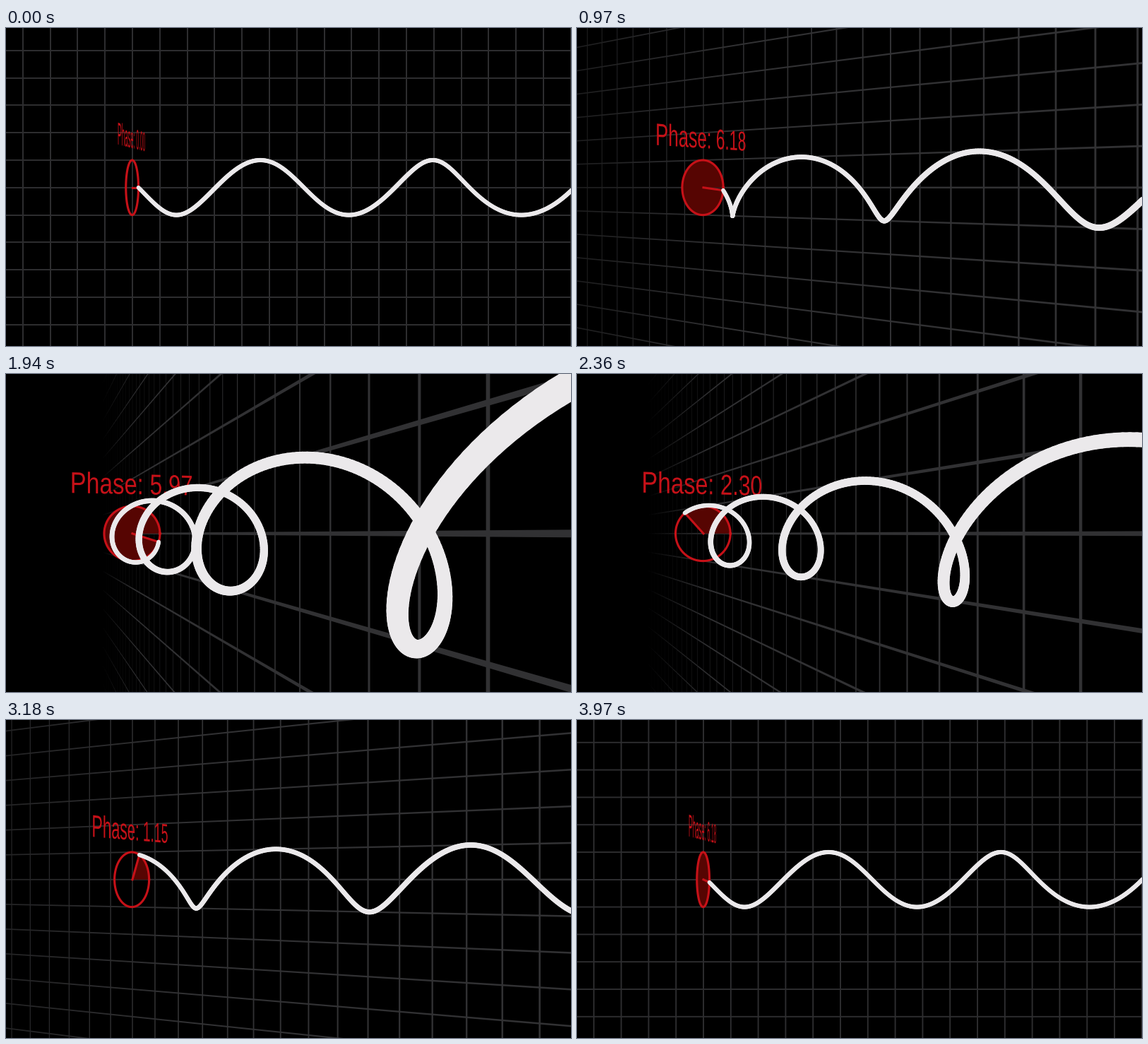
A matplotlib script for the animation above (4 s loop, 800 by 450 pixels).

```python
import numpy as np
import matplotlib.pyplot as plt
from matplotlib.animation import FuncAnimation
from matplotlib.collections import LineCollection, PolyCollection
from matplotlib.patches import PathPatch, Polygon
from matplotlib.path import Path
from matplotlib.textpath import TextPath

W, H, DPI = 800, 450, 100
PT = 72 / DPI                      # points per pixel

LOOP, TICK = 4000, 10              # ms
TICKS = LOOP // TICK
STEPS, POSES, CYCLE = 132, 240, 60

UNIT, DIST = 38.8, 24.94           # pixels per unit at the pivot, camera distance
FOCAL = UNIT * DIST
CX, CY = 400, 225.8
PIVOT = (179 - CX) / UNIT
SWING = np.radians(70)

RED, DARK_RED, WHITE = "#c61118", "#560502", "#ebe9eb"
GRID = np.array([49, 49, 51]) / 255
GRID_HALF = 0.025
FOG_NEAR, FOG_FAR = 24, 37
WAVE_PX, RING_PX = 6.05, 3.1

EM, CONDENSED, BASELINE = 1.06, 0.778, 1.44

plt.rcParams["font.family"] = "Liberation Sans"


def project(u, y, b, angle):
    """Map axis position u, height y and sideways offset b to pixels and depth."""
    u, y, b = np.broadcast_arrays(u, y, b)
    c, s = np.cos(angle), np.sin(angle)
    depth = DIST - u * s + b * c
    k = FOCAL / np.maximum(depth, 0.1)
    pts = np.stack([CX + k * (PIVOT + u * c + b * s), CY - k * y], axis=-1)
    return pts, depth


def strips(u0, u1, y0, y1):
    """Corner coordinates of rectangles lying in the grid plane."""
    return np.stack([u0, u1, u1, u0], axis=-1), np.stack([y0, y0, y1, y1], axis=-1)


def grid_quads(angle):
    end = min(30, 23.6 / max(np.sin(angle), 0.01))
    cols = np.arange(-16, end)
    tall = np.full(len(cols), 10.0)
    vu, vy = strips(cols - GRID_HALF, cols + GRID_HALF, -tall, tall)

    edges = np.append(np.arange(-16, 4), end)
    rows = np.arange(-10, 11)
    left, row = (a.ravel() for a in np.meshgrid(edges[:-1], rows))
    right, _ = (a.ravel() for a in np.meshgrid(edges[1:], rows))
    hu, hy = strips(left, right, row - GRID_HALF, row + GRID_HALF)

    quads, depth = project(np.concatenate([hu, vu]), np.concatenate([hy, vy]), 0.0, angle)
    light = np.clip((FOG_FAR - depth.mean(axis=1)) / (FOG_FAR - FOG_NEAR), 0, 1)
    x = quads[..., 0]
    seen = (light > 0) & (x.max(axis=1) > 0) & (x.min(axis=1) < W)
    return quads[seen], light[seen, None] * GRID


def wave_segments(phase, angle):
    u = np.arange(0, 30, 0.05)
    pts, depth = project(u, np.sin(phase - u), np.cos(phase - u), angle)
    segs = np.stack([pts[:-1], pts[1:]], axis=1)
    near = np.minimum(depth[:-1], depth[1:])
    seen = (near > 1.2) & (segs[..., 0].min(axis=1) < W + 80)
    widths = WAVE_PX * DIST / near[seen] * PT
    return segs[seen], widths


def label_path(phase, angle):
    text = TextPath((0, 0), f"Phase: {phase:.2f}", size=EM)
    v = text.vertices
    box = text.get_extents()
    b = (v[:, 0] - (box.x0 + box.x1) / 2) * CONDENSED + 0.045
    pts, _ = project(0.0, v[:, 1] + BASELINE, b, angle)
    return Path(pts, text.codes)


def arc(start, stop, angle, n=80):
    a = np.linspace(start, stop, n)
    return project(0.0, np.sin(a), np.cos(a), angle)[0]


fig = plt.figure(figsize=(W / DPI, H / DPI), dpi=DPI, facecolor="black")
ax = fig.add_axes([0, 0, 1, 1])
ax.set(xlim=(0, W), ylim=(H, 0))
ax.axis("off")

grid = ax.add_collection(PolyCollection([], linewidths=0, zorder=1), autolim=False)
pie = ax.add_patch(Polygon([[0, 0]] * 3, fc=DARK_RED, lw=0, zorder=2))
ring, = ax.plot([], [], color=RED, lw=RING_PX * PT, zorder=3)
hand, = ax.plot([], [], color=RED, lw=RING_PX * PT, zorder=3)
label = ax.add_patch(PathPatch(Path([[0, 0]]), fc=RED, lw=0, zorder=4))
wave = ax.add_collection(
    LineCollection([], colors=WHITE, capstyle="round", zorder=5), autolim=False)


def update(tick):
    step = int((tick + 0.5) * STEPS / TICKS)
    pose = -(-step * POSES // STEPS)
    phase = 2 * np.pi * (pose % CYCLE) / CYCLE
    angle = SWING * (1 - np.cos(2 * np.pi * pose / POSES)) / 2

    quads, colors = grid_quads(angle)
    grid.set_verts(quads)
    grid.set_facecolor(colors)

    hub = project(0.0, 0.0, 0.0, angle)[0]
    sector = arc(0, phase, angle)
    pie.set_xy(np.vstack([hub, sector]))
    hand.set_data(*np.vstack([hub, sector[-1]]).T)
    ring.set_data(*arc(0, 2 * np.pi, angle).T)
    label.set_path(label_path(phase, angle))

    segs, widths = wave_segments(phase, angle)
    wave.set_segments(segs)
    wave.set_linewidths(widths)
    return grid, pie, ring, hand, label, wave


anim = FuncAnimation(fig, update, frames=TICKS, interval=TICK,
                     repeat=True, repeat_delay=0, cache_frame_data=False)
plt.show()
```
